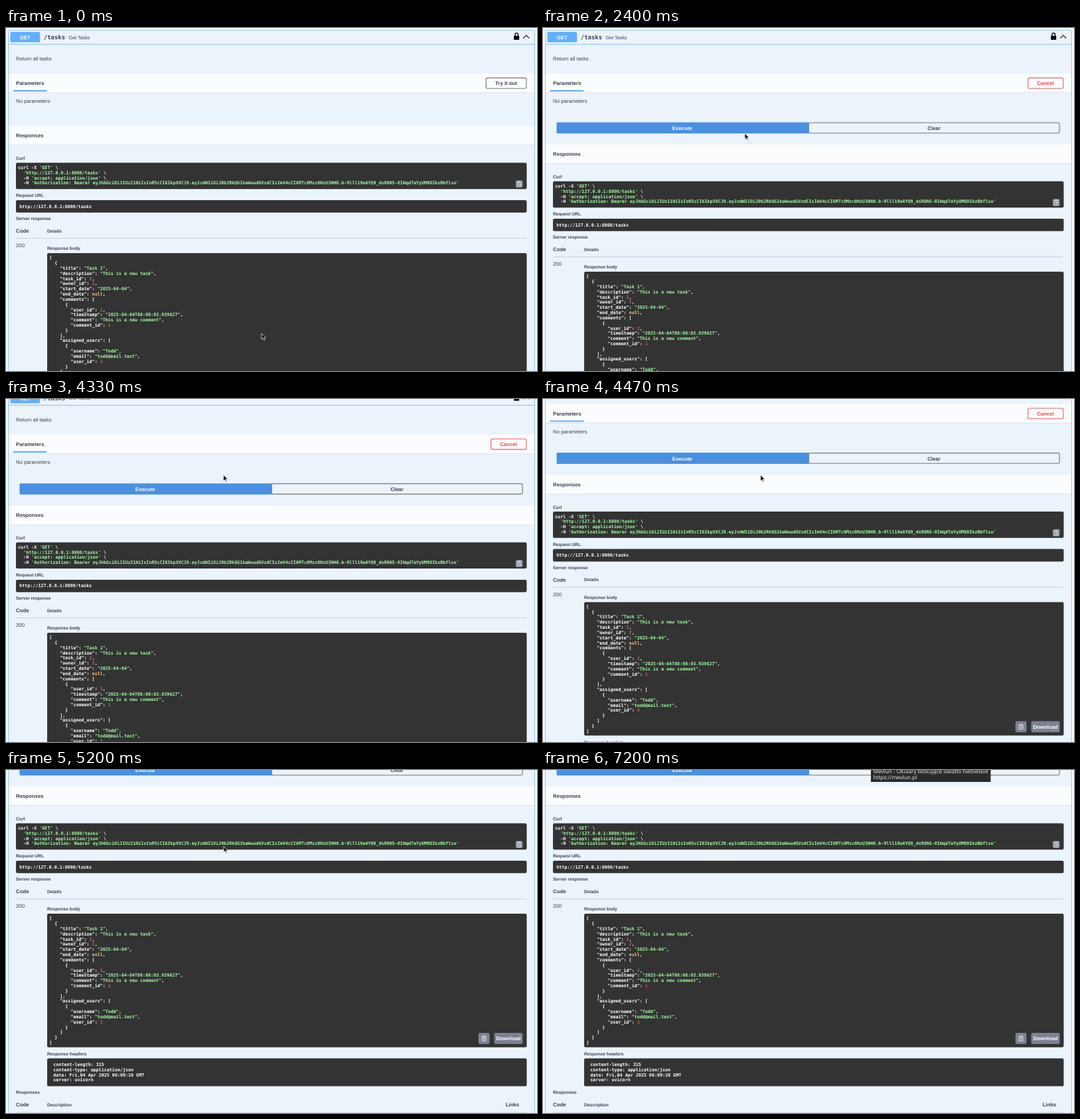
Recreate the animation shown at these times as an HTML page. Size 800 by 518 pixels, loop 7.4 s.

```html
<!DOCTYPE html>
<html lang="en">
<head>
<meta charset="utf-8">
<title>API documentation</title>
<style>
  html, body { margin: 0; width: 100%; height: 100%; overflow: hidden; background: #fafafa; }
  svg { display: block; width: 800px; height: 518px; }
  text { font: 7.81px "Liberation Sans", Arial, sans-serif; fill: #3b4151; white-space: pre; text-rendering: geometricPrecision; }
  .bold { font-weight: bold; }
  .small { font-weight: bold; font-size: 6.695px; }
  .mid { text-anchor: middle; }
  .code { font: bold 6.695px "DejaVu Sans Mono", monospace; fill: #fff; }
  .path { font: bold 8.93px "DejaVu Sans Mono", monospace; }
  .summary { font-size: 7.25px; }
  .white { fill: #fff; }
  .red { fill: #e5484a; }
  .tip { font: 8.2px "Open Sans", "Noto Sans", sans-serif; fill: #eee; }
  .string { fill: #a2fca2; }
  .number { fill: #c65e5e; }
  .null { fill: #fcc28c; }
</style>
</head>
<body>
<svg id="stage" viewBox="0 0 800 518"></svg>
<script>
const LOOP = 7400, FRAME = 200 / 3, CLICK = 1330, EXPANDED = 28;
const LINE = 7.83;

const escapeText = s => s.replace(/&/g, '&amp;').replace(/</g, '&lt;');
const text = (x, y, s, cls = '') => `<text x="${x}" y="${y}" class="${cls}">${escapeText(s)}</text>`;
const box = (x, y, w, h, fill, extra = '') =>
  `<rect x="${x}" y="${y}" width="${w}" height="${h}" rx="2.2" fill="${fill}" ${extra}/>`;
const outline = (x, y, w, h, color) => box(x, y, w, h, 'none', `stroke="${color}" stroke-width="1.1"`);
const panel = (x, y, h) => box(x, y, 784.5 - x, h, '#333');
const rule = y => `<path d="M15 ${y}H784" stroke="#3b4151" stroke-opacity=".3" stroke-width=".6"/>`;
const bar = y => `<path d="M4 ${y}H796v28.5H4z" fill="#fff" fill-opacity=".8"/>
  <path d="M4 ${y + 28.7}H796" stroke="#000" stroke-opacity=".1" stroke-width=".8"/>`;

// Colours quoted strings, numbers and null; keys stay white.
const highlight = (line, pattern) => line.replace(pattern, token => {
  const kind = /^["']/.test(token) ? 'string' : token === 'null' ? 'null' : 'number';
  return `<tspan class="${kind}">${token}</tspan>`;
});
const code = (x, y, source, pattern = /$^/g) => source.split('\n').map((line, i) =>
  `<text x="${x}" y="${y + i * LINE}" class="code">${highlight(line, pattern)}</text>`).join('');

const clipboard = (x, y, w, h) => box(x, y, w, h, '#7d8293') +
  `<g transform="translate(${x + w / 2} ${y + h / 2})" fill="none" stroke="#fff" stroke-width=".8">
    <path d="M3 -1V-3H-3V3.6H3V2.6M-1.4 -3.6H1.4M-1.6 -.8H1M-1.6 1H-.6M4 .8H.6M2 -.8L.5 .8L2 2.4"/></g>`;

const curl = `curl -X 'GET' \\
  'http://127.0.0.1:8000/tasks' \\
  -H 'accept: application/json' \\
  -H 'Authorization: Bearer eyJhbGciOiJIUzI1NiIsInR5cCI6IkpXVCJ9.eyJzdWIiOiJ0b2RkQG1haWwudGVzdCIsImV4cCI6MTc0Mzc0NzU3NH0.b-9lll19eAYQ9_dsR8NS-0IWqd7aYyUM0DIkzBbflso'`;

const tasks = [{
  title: 'Task 1',
  description: 'This is a new task',
  task_id: 2,
  owner_id: 2,
  start_date: '2025-04-04',
  end_date: null,
  comments: [{
    user_id: 2,
    timestamp: '2025-04-04T08:08:03.939627',
    comment: 'This is a new comment',
    comment_id: 1
  }],
  assigned_users: [{ username: 'Todd', email: 'todd@mail.test', user_id: 3 }]
}];

const headers = `content-length: 315
content-type: application/json
date: Fri,04 Apr 2025 06:09:10 GMT
server: uvicorn`;

const header = `
  <path d="M4 24.6H796" stroke="#61affe" stroke-width=".7"/>
  ${box(6.5, 6, 44.7, 15.6, '#61affe')}
  ${text(28.8, 16.8, 'GET', 'bold mid white')}
  ${text(56.8, 17, '/tasks', 'path')}
  ${text(94.4, 16.5, 'Get Tasks', 'summary')}
  <path d="M765.2 11.8h8v6h-8z"/>
  <path d="M766.9 12V10a2.3 2.3 0 0 1 4.6 0V12" fill="none" stroke="#000" stroke-width="1.3"/>
  <path d="M779.3 15.5L783.8 11L788.3 15.5" fill="none" stroke="#222" stroke-width="1.2"/>
  ${text(15, 48.7, 'Return all tasks')}
  ${bar(69)}
  ${text(15, 86, 'Parameters', 'bold')}
  <path d="M10.5 93.8h51v2.2h-51z" fill="#61affe"/>
  ${text(15, 112.9, 'No parameters')}`;

const idle = outline(723.3, 75.4, 60.7, 15.8, '#777') + text(753.5, 86.1, 'Try it out', 'bold mid');

const editing = `
  ${outline(730.7, 75.4, 53.2, 15.8, '#e9605f')}
  ${text(757, 86.1, 'Cancel', 'bold mid red')}
  ${outline(400.3, 143, 377.8, 15.7, '#777')}
  ${text(589, 153.9, 'Clear', 'bold mid')}
  <path d="M22 142.5H400.5v16.8H22q-1.5 0-1.5-1.5v-13.8q0-1.5 1.5-1.5z" fill="#4990e2"/>
  ${text(209.7, 153.9, 'Execute', 'bold mid white')}`;

const responses = `
  ${bar(148)}
  ${text(15, 164.9, 'Responses', 'bold')}
  ${text(15, 199.1, 'Curl', 'small')}
  ${panel(15, 203.5, 39.7)}
  ${code(18.1, 212.9, curl, /'[^']*'/g)}
  ${clipboard(767.8, 230, 10.8, 11)}
  ${text(15, 255.4, 'Request URL', 'small')}
  ${panel(15, 260, 18.8)}
  ${code(20.3, 271.5, 'http://127.0.0.1:8000/tasks')}
  ${text(15, 290.4, 'Server response', 'small')}
  ${text(15, 309, 'Code', 'bold')}
  ${text(62, 308.7, 'Details', 'small')}
  ${rule(317.6)}
  ${text(15, 330.9, '200')}
  ${text(62, 335.3, 'Response body', 'small')}
  ${panel(62, 340.1, 201.6)}
  ${code(65.2, 349.2, JSON.stringify(tasks, null, 2), /"[^"]*"(?=,|$)|\b\d+(?=,?$)|null/g)}
  ${clipboard(711.8, 520, 16.7, 16.7)}
  ${box(735.5, 520, 43, 16.7, '#7d8293')}
  ${text(757, 531, 'Download', 'bold mid white')}
  ${text(62, 553.9, 'Response headers', 'small')}
  ${panel(62, 558.6, 42)}
  ${code(71.3, 569.9, headers)}
  ${text(15, 612.4, 'Responses', 'small')}
  ${text(15, 630.9, 'Code', 'bold')}
  ${text(62, 630.6, 'Description', 'small')}
  ${text(752.8, 630.9, 'Links', 'bold')}
  ${rule(640)}`;

document.getElementById('stage').innerHTML = `
  <g id="page">
    ${box(3.5, 3.2, 793, 800, '#ebf3fb', 'stroke="#61affe" stroke-width=".7"')}
    ${header}
    <g id="idle">${idle}</g>
    <g id="editing">${editing}</g>
    <g id="responses">${responses}</g>
  </g>
  <g id="tooltip">
    <path d="M494 -2H674.5V18H494z" fill="#2b2b2b"/>
    ${text(497.8, 5, 'Mevlun - Okulary blokujące światło niebieskie', 'tip')}
    ${text(497.8, 13.8, 'https://mevlun.pl', 'tip')}
  </g>
  <path id="cursor" d="M0 0V9.2L2.1 7.3L3.6 10.5L5 9.9L3.6 6.7H6.5Z" fill="#111" stroke="#fff" stroke-width=".7"/>`;

const [page, idleView, editingView, responsesView, tooltip, cursor] =
  ['page', 'idle', 'editing', 'responses', 'tooltip', 'cursor'].map(id => document.getElementById(id));

// Tracks: [time, value, ...]
const scrollTrack = [[4200, 0], [4333, 15], [4467, 61.5], [4600, 127.5], [4733, 147], [4867, 151]];
const cursorTrack = [
  [0, 385, 461], [267, 420, 398], [467, 420, 398], [1200, 752, 84], [1267, 752, 84],
  [2067, 309, 168], [2333, 309, 168], [2400, 304, 159], [2867, 302, 151], [3600, 302, 151],
  [4000, 327.5, 114.5], [5200, 328, 115], [5533, 324, 124], [6000, 324, 124],
  [6133, 426, 43], [6333, 426, 43], [6400, 604, 36]
];
const linear = p => p;
const smooth = p => p * p * (3 - 2 * p);

function sample(track, time, ease) {
  const next = track.findIndex(key => key[0] > time);
  if (next === 0) return track[0].slice(1);
  if (next < 0) return track.at(-1).slice(1);
  const [from, to] = [track[next - 1], track[next]];
  const p = ease((time - from[0]) / (to[0] - from[0]));
  return from.slice(1).map((v, i) => v + (to[i + 1] - v) * p);
}

const show = (element, visible) => element.setAttribute('visibility', visible ? 'visible' : 'hidden');
const move = (element, x, y) => element.setAttribute('transform', `translate(${x} ${y})`);

function draw(now) {
  const time = Math.floor((now % LOOP + 4) / FRAME) * FRAME;
  const open = time >= CLICK;
  show(idleView, !open);
  show(editingView, open);
  move(responsesView, 0, open ? EXPANDED : 0);
  move(page, 0, -sample(scrollTrack, time, linear)[0]);
  move(cursor, ...sample(cursorTrack, time, smooth));
  show(cursor, time < 6460);
  tooltip.setAttribute('opacity', Math.min(1, Math.max(0, (time - 6866) / 267)));
}

const start = performance.now();
function tick() {
  draw(performance.now() - start);
  requestAnimationFrame(tick);
}
tick();
</script>
</body>
</html>
```
